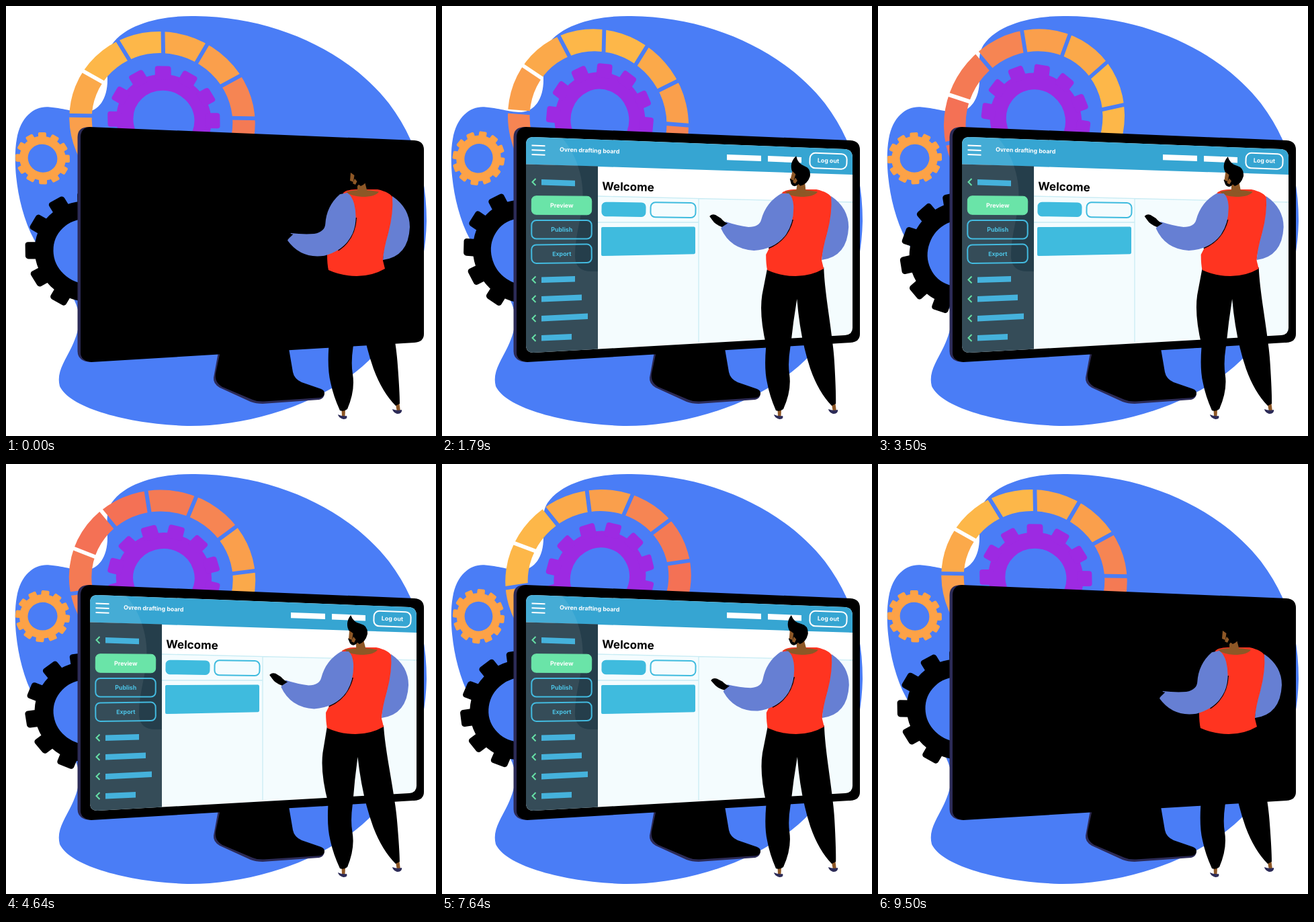
Recreate the animation shown at these times as an HTML page. Size 640 by 640 pixels, loop 9570 ms.

```html
<!DOCTYPE html>
<html lang="en">
<head>
<meta charset="utf-8">
<title>Editor at the big screen</title>
<style>
  html, body { margin: 0; width: 100%; height: 100%; overflow: hidden; background: #fff; }
  svg { display: block; width: 100%; height: 100%; }
  text { font-family: Inter, "Open Sans", sans-serif; font-weight: 700; font-size: 8.8px; }
  .title { font-size: 17px; }
</style>
</head>
<body>
<svg viewBox="0 0 640 640">
  <defs>
    <clipPath id="glass">
      <path d="M136 195L600 213Q611 214 611 226V479Q611 489 600 490L136 516Q125 516 125 505V206Q125 195 136 195Z"/>
    </clipPath>
    <mask id="band" maskUnits="userSpaceOnUse" x="-160" y="-160" width="320" height="320">
      <circle r="122.2" fill="none" stroke="#fff" stroke-width="33.6"/>
      <g id="spokes" stroke="#000" stroke-width="6"></g>
    </mask>
  </defs>

  <path fill="#4a7df6" d="M157 58C180 25 235 14 282 15C400 16 510 68 570 145C610 198 626 255 626 320C624 420 580 498 520 545C450 600 350 626 270 625C180 622 95 598 80 566C72 535 104 515 109 470C112 430 62 388 42 348C15 298 10 230 16 198C22 162 45 148 65 150.500C90 153 100 158 118 158C138 157 151 138 151 110C151 90 148 72 157 58Z"/>
  <g id="gears"></g>

  <!-- monitor -->
  <path fill="#2c2b57" d="M316 515L309 553Q308 562 318 568L364 589Q372 592 382 592L466 586Q474 584 474 576L460 575L330 514Z"/>
  <path d="M319 514L312 547Q310 560 322 567L367 586Q374 589 384 588.500L468 583Q474 581 474 576Q474 572 469 570L440 560Q429 555 427 545L421 510Z"/>
  <path fill="#2c2b57" d="M124 180Q106.500 180 106.500 195V514Q107 529 126 530L140 520V185Z"/>
  <path d="M125 180L608 200Q622 201 622 214V488Q622 500 608 501L127 530Q111 528 111 516V194Q112 181 125 180Z"/>

  <g id="screen" clip-path="url(#glass)">
    <path fill="#f4fcfe" d="M125 190H611V520H125Z"/>
    <path fill="#fff" d="M232 235L611 248V292L232 283Z"/>
    <path fill="#36a5d2" d="M125 190H611V251L125 235.500Z"/>
    <path fill="#253e4b" d="M125 235.500L232 238.500V520H125Z"/>
    <path fill="#fff" opacity=".075" d="M125 190H172C195 210 209 245 209.500 280C210 312 197 340 198 375Q200 395 222 395H232V520H125Z"/>
    <path fill="none" stroke="#c9ecf4" stroke-width="1.300" d="M232 283L611 292M382 287V500M232 322H382"/>
    <path fill="none" stroke="#fff" stroke-width="2" d="M133.500 207.500L153.500 208.200M133.500 214.300L153.500 215M133.500 221L153.500 221.700"/>
    <text x="175" y="216.500" fill="#fff" transform="rotate(2 175 216.500)">Ovren drafting board</text>
    <path fill="#fff" d="M424 221L475 222.700V231L424 229.200ZM485 223L535 225V233.500L485 231.500Z"/>
    <g transform="rotate(2 575 231)">
      <rect x="547.500" y="219.500" width="55" height="22.500" rx="8" fill="none" stroke="#fff" stroke-width="2"/>
      <text x="575" y="233.300" fill="#fff" text-anchor="middle">Log out</text>
    </g>
    <text class="title" x="238" y="274" transform="rotate(1.500 238 274)">Welcome</text>
    <rect x="237.500" y="292" width="66" height="21.500" rx="6.500" fill="#3fbbde" transform="rotate(.8 270 302)"/>
    <rect x="310.500" y="292.700" width="67" height="22" rx="7" fill="none" stroke="#3fbbde" stroke-width="2" transform="rotate(.8 344 304)"/>
    <path fill="#3fbbde" d="M239 329L375 328.500Q377 328.500 377 331V367Q377 369 375 369.200L239 372Q237 372 237 370V331Q237 329 239 329Z"/>
    <g id="side"></g>
  </g>

  <!-- person -->
  <path fill="#8d5726" d="M499.500 600H505L504.500 611H500ZM580 593L585.500 592L587 603L582 604Z"/>
  <path fill="#2c2b57" d="M494 608Q500 611 507 610Q509 615 502 615Q495 613 494 608ZM575 600Q582 603 589 601Q590 607 582 607Q576 605 575 600Z"/>
  <path id="legs" d="M480 390Q522 408 564 389C566 430 580 490 583 535Q586 575 586 592L580 595Q560 575 547 540Q531 495 525 436Q520 470 517 505Q513 530 516 548Q520 572 508 600Q503 604 497 602Q487 580 483 560Q478 540 480.500 505Q469 460 473 430Z"/>
  <g id="torso">
    <path fill="#ff3420" d="M502 278Q508 273 520 273H553Q572 277 577 287Q578 310 569 340Q561 372 561 379L564 391Q545 402 522 402Q500 402 480 393Q478 385 478 370Q500 330 502 278Z"/>
    <path fill="#667fd3" d="M575 283Q601 301 601 329Q599 373 561 378Q562 362 569 338Q577 308 575 283Z"/>
    <path fill="#8d5726" d="M506 276.500Q530 271 555 276.500Q550 284 530 284Q512 283 506 276.500Z"/>
    <g id="head">
      <path fill="#8d5726" d="M523 262L534 262L538 277H523Z"/>
      <path d="M515 225C508 234 509 243 513 249L520 262L528 268Q538 264 540 252Q540 240 530 238Q519 236 515 225Z"/>
      <path d="M511 260L514 267Q518 272 523 268L527 263L519 254Z"/>
      <path fill="#8d5726" d="M513 248L518.500 252L517 262L512 260ZM519 257L522.500 261L520 266L516 264Z"/>
    </g>
    <g id="arm">
      <path fill="none" stroke="#000" stroke-width="1.500" d="M482 360.500Q510 349 518 318"/>
      <path fill="#667fd3" d="M501 279Q478 292 471 318Q468 329 452 329Q436 327 418 321L411 331Q425 362 460 364Q492 362 508 340Q520 322 519 297Q518 284 512 279Z"/>
      <path d="M394 313Q397 309 403 311L411 316Q416 322 421 323.500L412.500 329Q402 325 398 318.500Z"/>
    </g>
  </g>
</svg>
<script>
const NS = 'http://www.w3.org/2000/svg';
const LOOP = 9570, FPS = 14;
const $ = id => document.getElementById(id);

function add(parent, tag, attrs) {
  const el = document.createElementNS(NS, tag);
  for (const k in attrs) el.setAttribute(k, attrs[k]);
  return parent.appendChild(el);
}

// Every wheel is a circle squeezed along one tilted axis; lift moves it off its axle.
const wheels = [];

function wheel(x, y, turns, lift = 0) {
  const spin = add($('gears'), 'g', {});
  wheels.push({ spin, x, y, turns });
  return add(spin, 'g', { transform: `matrix(.9944 .0163 .0163 .9526 0 ${-lift})` });
}

function polar(r, deg, ox = 0, oy = 0) {
  const a = deg * Math.PI / 180;
  return [ox + r * Math.cos(a), oy + r * Math.sin(a)];
}

function buildRing() {
  const shades = ['#fdb749', '#fba94a', '#fa9f4c', '#f68553', '#f47a54', '#f47155'];
  const hub = [3.3, -5.8];
  const sectors = add(wheel(232.5, 170.5, 1), 'g', { mask: 'url(#band)' });
  for (let k = 0; k < 12; k++) {
    const a = polar(190, 30 * k - 120, ...hub), b = polar(190, 30 * k - 90, ...hub);
    add(sectors, 'path', { d: `M${hub}L${a}L${b}Z`, fill: shades[Math.min(k, 11 - k)] });
    add($('spokes'), 'path', { d: `M${hub}L${a}` });
  }
}

function buildGear(g, color, tip, body, hole, tooth) {
  add(g, 'circle', { r: (body + hole) / 2, fill: 'none', stroke: color, 'stroke-width': body - hole });
  for (let k = 0; k < 12; k++) {
    add(g, 'rect', {
      x: body - tooth / 3, y: -tooth / 2, width: tip - body + tooth / 3, height: tooth,
      rx: tooth * .17, fill: color, transform: `rotate(${30 * k})`
    });
  }
}

function buildSide() {
  const side = $('side');
  // chevron y, bar length, bar rise from left to right
  const rows = [[262, 50, -1.8], [407.5, 50, 1.6], [436, 60, 2.6], [465, 69, 3.6], [494, 45, 2]];
  for (const [y, w, rise] of rows) {
    add(side, 'path', { d: `M139.500 ${y - 5}L134.500 ${y}L139.500 ${y + 5}`, fill: 'none', stroke: '#66e0a6', 'stroke-width': 2 });
    add(side, 'path', { d: `M148 ${y - 4}l${w} ${-rise}v8.500l${-w} ${rise}Z`, fill: '#45b2dc' });
  }
  ['Preview', 'Publish', 'Export'].forEach((label, i) => {
    const y = 283 + 36 * i, solid = i === 0;
    const g = add(side, 'g', { transform: `rotate(${[.5, 0, -.6][i]} 178 ${y + 14})` });
    add(g, 'rect', {
      x: 133.3, y: y, width: 89.4, height: 27.5, rx: 7,
      fill: solid ? '#6ae4a8' : 'none', stroke: solid ? '#6ae4a8' : '#43bbe0', 'stroke-width': solid ? 1 : 2
    });
    add(g, 'text', { x: 178.3, y: y + 17, 'text-anchor': 'middle', fill: solid ? '#fff' : '#4cc3e5' }).textContent = label;
  });
}

const smooth = p => { p = Math.max(0, Math.min(1, p)); return p * p * (3 - 2 * p); };

// Eased value between [time, value] keys.
function track(keys, t) {
  for (let i = 1; i < keys.length; i++) {
    const [t0, v0] = keys[i - 1], [t1, v1] = keys[i];
    if (t <= t1) return v0 + (v1 - v0) * smooth((t - t0) / (t1 - t0));
  }
  return keys[keys.length - 1][1];
}

const SWAY = [[0, 0], [2400, 5], [5800, -4.5], [7400, 5], [9500, 0]];
const REACH = [[0, -11.5], [1700, 0], [3500, 0], [6500, -1.5], [9500, -11.5]];
const NOD = [[0, 0], [1700, 9], [4800, 0], [6000, -1], [7640, 0], [9500, 0]];
const LIGHT = [[0, 0], [1250, 1], [8500, 1], [9500, 0]];

function draw(t) {
  const angle = 360 * smooth(t / LOOP);
  for (const w of wheels)
    w.spin.setAttribute('transform', `translate(${w.x} ${w.y}) rotate(${angle * w.turns})`);

  // Feet stay put while the hips follow the torso.
  const sway = track(SWAY, t), k = -sway / 207;
  $('legs').setAttribute('transform', `matrix(1 0 ${k} 1 ${-k * 600} 0)`);
  $('torso').setAttribute('transform', `translate(${sway} 0)`);
  $('arm').setAttribute('transform', `rotate(${track(REACH, t)} 505 300)`);
  $('head').setAttribute('transform', `rotate(${track(NOD, t)} 530 275)`);
  $('screen').setAttribute('opacity', track(LIGHT, t));
}

buildRing();
buildGear(wheel(234.9, 169.5, 2), '#9d2ae2', 84, 71, 45.8, 24);
buildGear(wheel(54.5, 226.7, 3), '#fda247', 40.6, 34.5, 22, 12);
buildGear(wheel(120.7, 367.2, 1, 2), '#000', 92.5, 78.5, 50.5, 26.5);
buildSide();

const start = performance.now();
function tick() {
  const t = (performance.now() - start) % LOOP;
  draw(Math.floor((t + 5) * FPS / 1000) * 1000 / FPS);
  requestAnimationFrame(tick);
}
tick();
</script>
</body>
</html>
```
